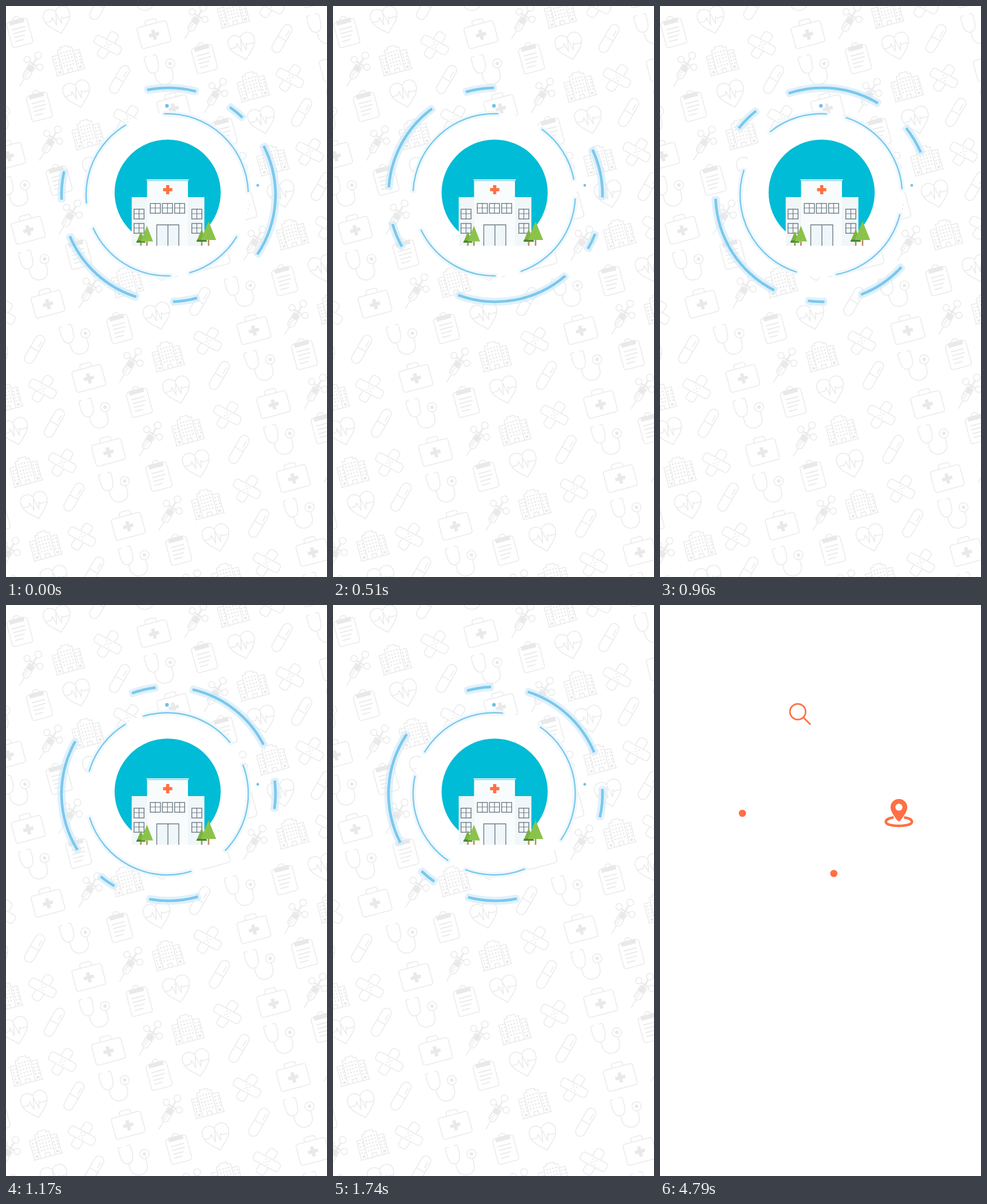
An HTML page that plays this animation: 561 px wide and 998 px high, repeating every 4820 ms.

```html
<!DOCTYPE html>
<html lang="en">
<head>
<meta charset="utf-8">
<title>Hospital search</title>
<style>
html, body { margin: 0; width: 100%; height: 100%; overflow: hidden; background: #fff; }
svg { display: block; width: 100%; height: 100%; }
.icon { fill: none; stroke: #ebebeb; stroke-width: 1.6; stroke-linecap: round; stroke-linejoin: round; }
.solid { fill: #e9e9e9; stroke: none; }
.white { fill: #fff; }
.ring { fill: #7ac8ec; stroke-linejoin: round; paint-order: stroke; }
#outer { stroke: #d3ebf9; stroke-opacity: .7; stroke-width: 9.5; }
#inner { stroke: #eef8fd; stroke-opacity: .92; stroke-width: 7.5; }
.pane { fill: none; stroke: #6d7a84; stroke-width: 1.4; }
</style>
</head>
<body>
<svg viewBox="0 0 561 998" preserveAspectRatio="none">
  <defs>
    <g id="pill" transform="rotate(45)">
      <rect x="-8.5" y="-27" width="17" height="54" rx="8.5"/>
      <path d="M-8.5 0H8.5M4 -18V-7"/>
    </g>
    <g id="steth">
      <path d="M-16 -30h-3q-2.500 0 -2.500 3v9c0 14 5 19 11 19s11 -5 11 -19v-9q0 -3 -2.500 -3h-3"/>
      <path d="M-10.500 1v8c0 21 31 22 31 1v-10"/>
      <circle cx="20.500" cy="-8" r="8"/><circle class="solid" cx="20.500" cy="-8" r="3"/>
    </g>
    <g id="clip">
      <rect x="-18.500" y="-20" width="37" height="45" rx="4"/>
      <path d="M-6 -21a6 6 0 0 1 12 0"/>
      <path class="solid" d="M-13 -22h26v8h-26z"/>
      <path stroke-width="2" d="M-11 -6H11M-11 1H11M-11 8H7M-11 15H3"/>
    </g>
    <g id="heart">
      <path d="M0 24C-8 15 -23.500 6 -23.500 -9C-23.500 -18 -17 -22 -12 -22C-6 -22 -2 -19 0 -15C2 -19 6 -22 12 -22C17 -22 23.500 -18 23.500 -9C23.500 6 8 15 0 24Z"/>
      <path d="M-22 -1H-11L-8 -7L-4 8L0 -13L5 8L8 -4L10 -1H22"/>
    </g>
    <g id="bandage">
      <rect class="white" x="-25" y="-8" width="50" height="16" rx="5" transform="rotate(-42)"/>
      <rect class="white" x="-25" y="-8" width="50" height="16" rx="5" transform="rotate(43)"/>
      <path stroke-width="2.600" d="M0 -5h.01M-5 0h.01M0 0h.01M5 0h.01M0 5h.01"/>
    </g>
    <g id="bag">
      <rect x="-26.500" y="-16" width="53" height="38" rx="4"/>
      <path d="M-10 -16v-4q0 -4 4 -4h12q4 0 4 4v4"/>
      <path class="solid" d="M-3 -6h6v6h6v6h-6v6h-6v-6h-6v-6h6z"/>
    </g>
    <g id="syringe" transform="rotate(46)">
      <circle cx="0" cy="-27" r="6"/>
      <circle cx="-13" cy="-11" r="5.500"/><circle cx="13" cy="-11" r="5.500"/>
      <path stroke-width="3" d="M0 -20V-6M-7 -10H7"/>
      <path d="M-6 -6H6V16L2 20H-2L-6 16ZM0 20V36"/>
      <path class="solid" d="M-5 -5H5V5H-5z"/>
      <path d="M-5 8H1M-5 12H1M-5 16H1"/>
    </g>
    <g id="hospital">
      <path d="M-13 23V-20H-7V-24H7V-20H13V23M-13 -12H-24.500V23M13 -12H24.500V23M-26 23H26M-4 23V16H4V23"/>
      <path class="solid" d="M-21 16h5v4h-5zM16 16h5v4h-5z"/>
      <path stroke-width="2.800" stroke-linecap="butt" stroke-dasharray="2.800 2.600" d="M-9.500 -14H10M-9.500 -8H10M-9.500 -2H10M-9.500 4H10M-9.500 10H10M-22 -6h8.500M-22 0h8.500M-22 6h8.500M-22 11.500h8.500M15 -6h8.500M15 0h8.500M15 6h8.500M15 11.500h8.500"/>
    </g>
    <g id="window" class="pane">
      <rect x=".7" y=".7" width="17.600" height="17"/>
      <path d="M9.500 0V18M0 8.500H19" stroke-width="1.200"/>
    </g>
  </defs>

  <g id="scene">
    <g id="pattern" class="icon"></g>
    <circle cx="282" cy="330" r="143" fill="#fff"/>
    <g id="outer" class="ring"></g>
    <g id="inner" class="ring"></g>
    <g fill="#70c1ea"><circle cx="281.300" cy="174.500" r="3.200"/><circle cx="440" cy="313.400" r="2.400"/></g>

    <circle cx="282.500" cy="326.200" r="92.700" fill="#00bcd6"/>
    <path fill="#f1f6f8" d="M219.700 334H346.700V419H219.700z"/>
    <path fill="#f8fcfc" d="M246.500 306H318V419H246.500z"/>
    <path fill="#f5fbfb" d="M245.500 303H319.500V304.800H245.500z"/>
    <path fill="#8fd6e2" d="M246.500 304.800H318V306H246.500z"/>
    <path fill="#ff6f43" d="M279.800 313h5.600v5.300h5.300v5.400h-5.300v5.300h-5.600v-5.300h-5.300v-5.400h5.300z"/>
    <g id="windows"></g>
    <path fill="#f0f7fa" d="M263 382H302V419H263z"/>
    <path class="pane" stroke-width="1.300" d="M263.500 419V382.500H302V419M283 382V419"/>
    <g id="trees"></g>
  </g>

  <g id="marks" fill="#ff6f43">
    <g fill="none" stroke="#ff6f43">
      <circle cx="240.800" cy="186.500" r="13.700" stroke-width="2.700"/>
      <path d="M250.500 196.500L263 209" stroke-width="2.900"/>
      <path d="M408.500 371.300C400 372.500 394.700 375.500 394.700 379C394.700 383.300 404.500 386 417.500 386S440.300 383.300 440.300 379C440.300 375.500 435 372.500 426.500 371.300" stroke-width="4.500"/>
    </g>
    <circle cx="144" cy="364" r="6.300"/><circle cx="303.800" cy="469.200" r="6.300"/>
    <path fill-rule="evenodd" d="M417.500 339C425.500 339 432.200 345.300 432.200 353.300C432.200 361 425 370 421 375.800Q417.500 380.500 414 375.800C410 370 402.900 361 402.900 353.300C402.900 345.300 409.500 339 417.500 339ZM417.500 347.200a6.200 6.200 0 1 0 .01 0z"/>
  </g>
</svg>
<script>
const $ = id => document.getElementById(id);
const LOOP = 4820, STEP = 30;

// Background: rows of four icons, laid out on a slanted grid with two seams.
const ROWS = [
  [['pill', 50, 600], ['steth', 121, 585], ['clip', 198, 562], ['heart', 265, 542]],
  [['bandage', 64, 669], ['bag', 144, 648], ['syringe', 217, 627], ['hospital', 282, 611]]
];
const DOWN = [34.4, 129.2], ACROSS = [288.5, -83.5];
let tiles = '';
for (let row = -6; row < 5; row++) {
  for (let group = -1; group < 3; group++) {
    let dx = 0, dy = 0;
    if (row < 0) { dx -= 37; dy -= .5; }
    if (row < 0 && group === 2) { dx -= 4.5; dy += 12; }
    if (row >= 0 && group === -1) { dx += 5.5; dy -= 11; }
    for (const [name, x0, y0] of ROWS.flat()) {
      const x = x0 + row * DOWN[0] + group * ACROSS[0] + dx;
      const y = y0 + row * DOWN[1] + group * ACROSS[1] + dy;
      if (x < -45 || x > 606 || y < -45 || y > 1043) continue;
      tiles += `<use href="#${name}" transform="translate(${x.toFixed(1)} ${y.toFixed(1)}) rotate(-15)"/>`;
    }
  }
}
$('pattern').innerHTML = tiles;

// Rings: each arc is a thin closed band, so its halo gets soft corners.
function band(cx, cy, r, w, from, to) {
  const at = (rad, deg) => {
    const a = deg * Math.PI / 180;
    return (cx + rad * Math.cos(a)).toFixed(2) + ' ' + (cy + rad * Math.sin(a)).toFixed(2);
  };
  const o = r + w / 2, i = r - w / 2;
  return `<path d="M${at(o, from)}A${o} ${o} 0 0 1 ${at(o, to)}L${at(i, to)}A${i} ${i} 0 0 0 ${at(i, from)}Z"/>`;
}
const OUT = { x: 284, y: 330 }, IN = { x: 281.7, y: 330 };
$('outer').innerHTML = [[-101.5, -75.1], [-55.1, -46.2], [-27.2, 33.9], [74.5, 87.6], [107.5, 157.2], [177.4, 192.7]]
  .map(([a, b]) => band(OUT.x, OUT.y, 187, 4.6, a, b)).join('');
$('inner').innerHTML = [[-92.4, -2], [30.8, 74.2], [87.6, 156], [173.9, 239.5]]
  .map(([a, b]) => band(IN.x, IN.y, 141.8, 2.4, a, b)).join('');

$('windows').innerHTML = [[251.5, 344.5], [272.7, 344.5], [294, 344.5], [223, 354.5], [324, 354.5], [223, 379.5], [324, 379.5]]
  .map(([x, y]) => `<use href="#window" x="${x}" y="${y}"/>`).join('');

// Trees: x, top, bottom of leaves, half width, shade height
$('trees').innerHTML = [[235.7, 394, 413.5, 8, 3.5], [246.3, 384, 411.5, 10.7, 0], [342, 390, 412, 9.3, 3.5], [354, 376, 409, 13.3, 0]]
  .map(([x, top, low, half, shade]) =>
    `<path fill="#b98a5e" d="M${x - 1.3} ${low}h2.600V419h-2.600z"/>` +
    `<path fill="${shade ? '#7cb342' : '#8bc34a'}" d="M${x} ${top}L${x + half} ${low}H${x - half}Z"/>` +
    (shade ? `<path fill="#43892f" d="M${x - half + 1.3} ${low - shade}H${x + half - 1.3}L${x + half} ${low}H${x - half}Z"/>` : ''))
  .join('');

// Piecewise linear value from [time, value] steps
function track(steps, t) {
  for (let i = 1; i < steps.length; i++) {
    const [t0, v0] = steps[i - 1], [t1, v1] = steps[i];
    if (t < t1) return v0 + (v1 - v0) * (t - t0) / (t1 - t0);
  }
  return steps[steps.length - 1][1];
}
const OUTER_TURN = [[0, 0], [1200, 180]];
const INNER_TURN = [[0, 0], [1320, -220], [1890, -360]];

function draw(ms) {
  const t = ms % LOOP, tick = Math.floor(t / STEP) * STEP;
  $('outer').setAttribute('transform', `rotate(${track(OUTER_TURN, tick)} ${OUT.x} ${OUT.y})`);
  $('inner').setAttribute('transform', `rotate(${track(INNER_TURN, tick)} ${IN.x} ${IN.y})`);
  $('marks').style.display = t >= 2090 ? '' : 'none';
  $('scene').style.display = t < 4790 ? '' : 'none';
}

draw(0);
let start;
requestAnimationFrame(function loop(now) {
  start ??= now;
  draw(Math.max(0, now - start));
  requestAnimationFrame(loop);
});
</script>
</body>
</html>
```
